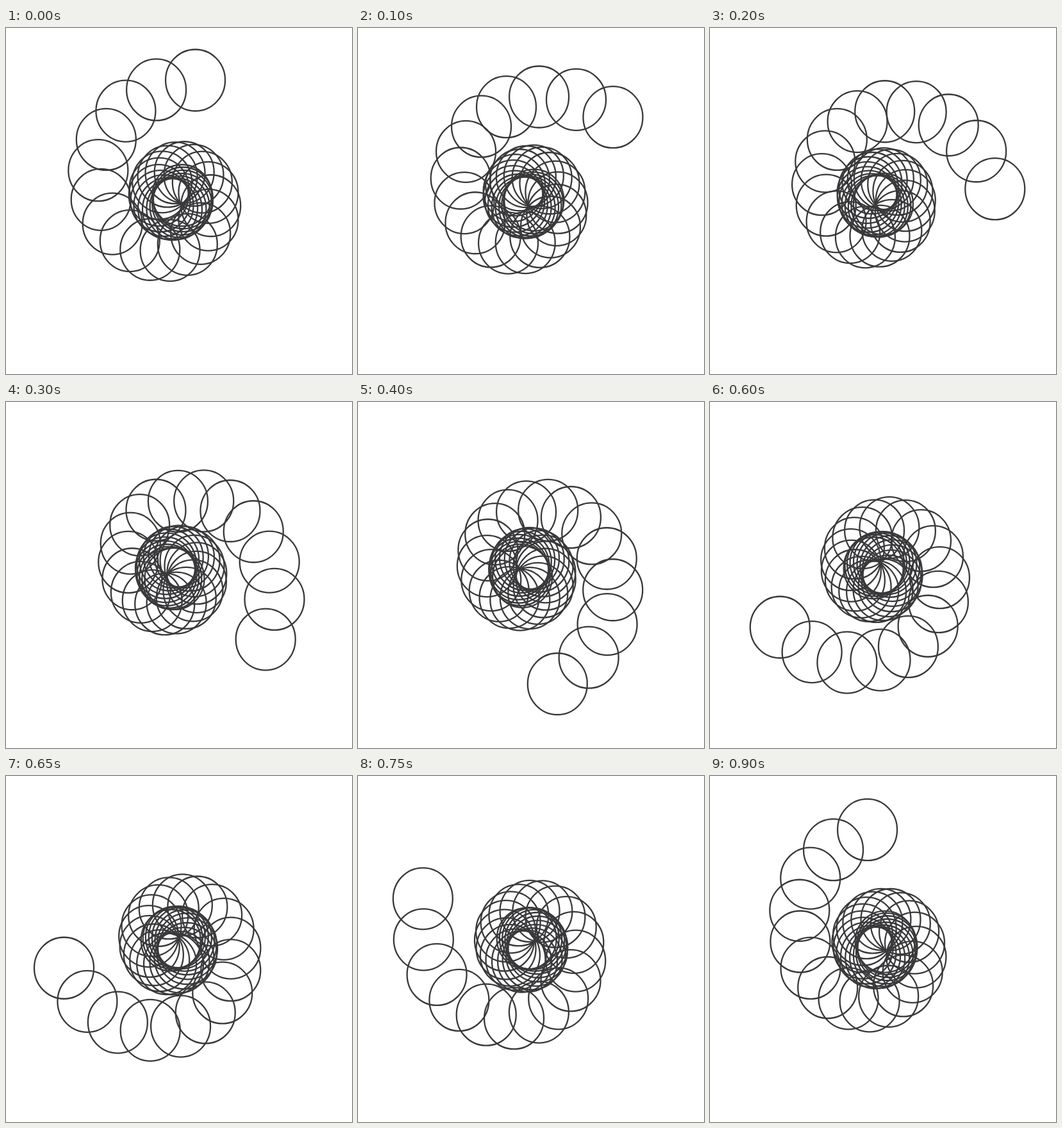
These frames come from a looping animation (540x540 px, 950 ms). An HTML page with a canvas:

```html
<!DOCTYPE html>
<html lang="en">
<head>
<meta charset="utf-8">
<title>Spiral of rings</title>
<style>
  html, body { margin: 0; width: 100%; height: 100%; overflow: hidden; background: #fff; }
  canvas { display: block; width: 540px; height: 540px; }
</style>
</head>
<body>
<canvas id="stage" width="540" height="540"></canvas>
<script>
const ctx = document.getElementById('stage').getContext('2d');
const LOOP = 950, TICK = 50;
const RINGS = 33, TURN = 20.6, SHRINK = 0.9165;
const RX = 46.5, RY = 48, SQUASH = RX / RY;

// time in ms, angle of the outer ring in degrees, its distance from the hub
const POSES = [
  [0, -79.3, 183.7], [200, -3.3, 188.5], [300, 36.4, 183], [400, 74.2, 185],
  [600, 150.5, 181.8], [750, 203, 180.8], [900, 264.4, 178.9], [950, 280.7, 183.7]
];

function poseAt(t) {
  const k = POSES.findIndex(p => p[0] > t);
  const a = POSES[k - 1], b = POSES[k];
  const u = (t - a[0]) / (b[0] - a[0]);
  return [a[1] + (b[1] - a[1]) * u, a[2] + (b[2] - a[2]) * u];
}

function draw(t) {
  const [angle, reach] = poseAt(t);
  ctx.fillStyle = '#fff';
  ctx.fillRect(0, 0, 540, 540);
  ctx.strokeStyle = '#39393b';
  ctx.lineWidth = 2.3;
  for (let i = 0; i < RINGS; i++) {
    const scale = SHRINK ** i;
    const a = (angle - TURN * i) * Math.PI / 180;
    // the hub drifts slightly towards the inner rings
    const x = 262.5 + 2 * (1 - scale) + reach * scale * SQUASH * Math.cos(a);
    const y = 262 + 3 * (1 - scale) + reach * scale * Math.sin(a);
    ctx.beginPath();
    ctx.ellipse(x, y, RX, RY, 0, 0, Math.PI * 2);
    ctx.stroke();
  }
}

function loop() {
  const t = performance.now() % LOOP;
  draw(Math.floor(t / TICK) * TICK);
  requestAnimationFrame(loop);
}
loop();
</script>
</body>
</html>
```
